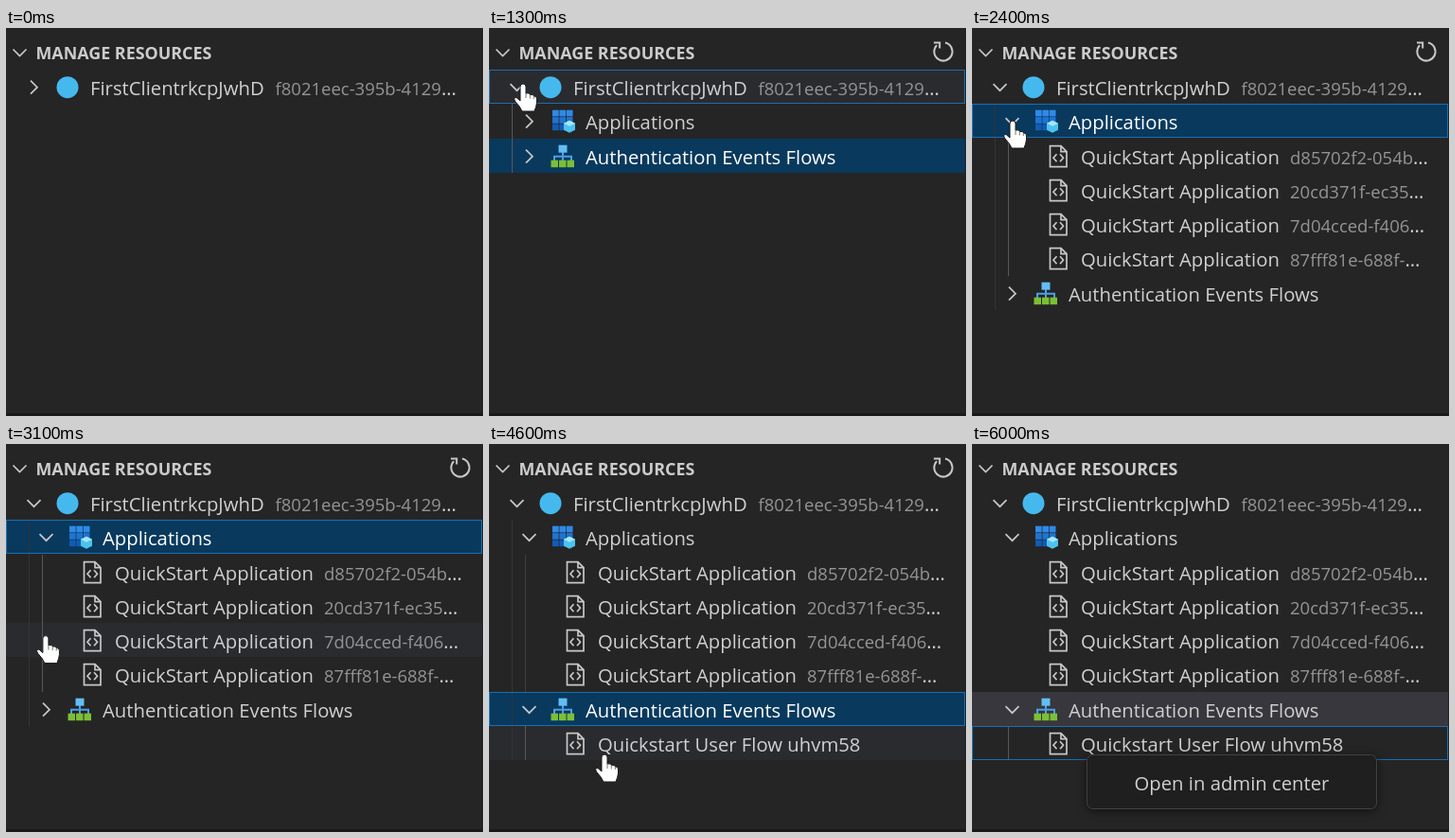
These frames come from a looping animation (504 px wide and 410 px high, 6100 ms). An HTML page:

```html
<!DOCTYPE html>
<html lang="en">
<head>
<meta charset="utf-8">
<title>Resource tree</title>
<style>
  html, body { margin: 0; width: 100%; height: 100%; overflow: hidden; background: #252526; }
  svg { display: block; font: 20.3px "Open Sans", "Noto Sans", sans-serif; fill: #d0d0d0; }
  .bold { font-size: 17.9px; font-weight: 700; fill: #ccc; }
  .id { font-size: 18.5px; fill: #949494; }
  .line { fill: none; stroke: #c8c8c8; stroke-width: 1.7; }
</style>
</head>
<body>
<svg id="stage" width="504" height="410" viewBox="0 0 504 410"></svg>
<script>
const LOOP = 6100, TOP = 44, ROW = 36.25;
const EXPAND_ROOT = 1100, EXPAND_APPS = 2300, EXPAND_FLOWS = 3800, MENU = 4700;
const stage = document.getElementById('stage');

// Pointer path: time, x, y
const path = [
  [400, 40, 72], [800, 36, 59], [1400, 36, 59], [2100, 43, 98], [2800, 43, 98],
  [3370, 41, 291], [3900, 41, 291], [4250, 126, 348], [4500, 122, 328], [MENU, 122, 328]
];

const rect = (x, y, w, h, fill, more = '') =>
  `<rect x="${x}" y="${y}" width="${w}" height="${h}" fill="${fill}" ${more}/>`;
const text = (x, y, s, more = '') => `<text x="${x}" y="${y}" ${more}>${s}</text>`;
const line = (d, more = '') => `<path class="line" d="${d}" ${more}/>`;
const at = (x, y, s) => `<g transform="translate(${x} ${y})">${s}</g>`;

const chevron = (x, y, open) =>
  at(x, y, line(open ? 'M-7-3.5L0 3.5L7-3.5' : 'M-3.5-7L3.5 0L-3.5 7'));

const icons = {
  root: '<circle r="11.5" fill="#45b9ee"/>',
  apps: [0, 1, 2].map(r => [0, 1, 2].map(c =>
      rect(-11 + c * 7.4, -12 + r * 7.4, 6.7, 6.7, ['#2f8ae6', '#1f74d2', '#125cb4'][r])).join('')).join('') +
    '<path d="M7-1L13 2V9L7 12L1 9V2Z" fill="#4cc3ee"/><path d="M7-1L13 2L7 5L1 2Z" fill="#a5e6fa"/>',
  flows: '<path d="M0-5V5M-9 5V0H9V5" fill="none" stroke="#4a9fe6" stroke-width="2"/>' +
    rect(-4.5, -12, 9, 8, '#62bdf4') +
    [-12.5, -4, 4.5].map(x => rect(x, 4, 7.5, 7.5, '#7cbf35')).join(''),
  file: line('M-8.5-11H3L9-5V11H-8.5ZM3-11V-5H9M-1.5-2.5L-5 1.5L-1.5 5.5M2-2.5L5.5 1.5L2 5.5')
};

const refresh = line('M482 15.6A9.6 9.6 0 1 1 473.2 18.2M470 15.5H476.2V21.5', 'style="stroke-width:2"');
const hand = '<path d="M-3 3A3 3 0 0 1 3 3V10Q7 9 7.5 11.5Q11 10.5 11.5 13Q14.5 12.5 14.5 16V20Q14 24 12 29H-1' +
  'Q-3 24-8 19Q-11 14.5-7 14.5L-3 18Z" fill="#fff" stroke="#1a1a1a"/>' +
  '<path d="M3 10V15M7.3 11.5V15.5M11.3 13V16" stroke="#555" stroke-width=".8"/>';

const leaf = (name, id) => ({ level: 2, icon: 'file', name, id, idX: 336 });

function rowsAt(t) {
  const root = t >= EXPAND_ROOT, apps = t >= EXPAND_APPS, flows = t >= EXPAND_FLOWS;
  const rows = [{ level: 0, icon: 'root', name: 'FirstClientrkcpJwhD', id: 'f8021eec-395b-4129', idX: 284.5, open: root }];
  if (root) rows.push({ level: 1, icon: 'apps', name: 'Applications', open: apps });
  if (apps) rows.push(...['d85702f2-054b', '20cd371f-ec35', '7d04cced-f406', '87fff81e-688f-']
    .map(id => leaf('QuickStart Application', id)));
  if (root) rows.push({ level: 1, icon: 'flows', name: 'Authentication Events Flows', open: flows });
  if (flows) rows.push(leaf('Quickstart User Flow uhvm58'));
  return rows;
}

// Selected row, focused row and the guide shown as active: [x, first row, end row]
function stateAt(t) {
  if (t < EXPAND_ROOT) return {};
  if (t < EXPAND_APPS) return { selected: 2, focus: 0, guide: [24.5, 1, 3] };
  if (t < EXPAND_FLOWS) return { selected: 1, focus: 1, guide: [38.5, 2, 6] };
  return { selected: 6, focus: t < MENU ? 6 : 7, guide: [38.5, 7, 8] };
}

function pointerAt(t) {
  const i = path.findIndex(p => p[0] > t);
  if (i < 1) return null;
  const [t0, x0, y0] = path[i - 1], [t1, x1, y1] = path[i];
  const u = (t - t0) / (t1 - t0), e = u * u * (3 - 2 * u);
  return { x: x0 + (x1 - x0) * e, y: y0 + (y1 - y0) * e };
}

const rowTop = i => Math.round(TOP + i * ROW);
const guideLine = ([x, a, b], color) =>
  `<path d="M${x} ${rowTop(a)}V${rowTop(b)}" stroke="${color}"/>`;

function drawRow(row, i, lit) {
  const y = rowTop(i), x = 89 + row.level * 13, mid = y + 18.7;
  let s = row.level < 2 ? chevron(29.5 + row.level * 13, mid, row.open) : '';
  s += at(x - 24, mid, icons[row.icon]);
  s += text(x, y + 27, row.name, lit ? 'fill="#fff"' : '');
  if (row.id) s += text(row.idX, y + 27, `<tspan class="id">${row.id}</tspan>…`);
  return s;
}

function draw(t) {
  const rows = rowsAt(t), state = stateAt(t), pointer = pointerAt(t), menu = t >= MENU;
  const hover = pointer ? Math.floor((pointer.y - TOP) / ROW) : -1;
  const band = (i, fill) => rect(0, rowTop(i), 504, 36, fill);
  let s = '';
  if (hover >= 0 && hover < rows.length) s += band(hover, '#2a2b2e');
  if (state.selected) s += band(state.selected, menu ? '#37373d' : '#09395d');
  if (pointer && rows.length > 3) {
    s += guideLine([24.5, 1, rows.length], '#343434') + guideLine([38.5, 2, 6], '#3e3e3e');
  }
  if (state.guide) s += guideLine(state.guide, '#585858');
  s += rect(503, 0, 1, 410, '#1f1f1f') + rect(0, 407, 504, 3, '#1c181a');
  if (state.focus >= 0) {
    s += rect(0.5, rowTop(state.focus) + 0.5, 502, 35, 'none', 'stroke="#1a6fb0"');
  }
  s += chevron(14.5, 26, true) + text(31.5, 33, 'MANAGE RESOURCES', 'class="bold"');
  s += rows.map((row, i) => drawRow(row, i, i === state.selected && !menu)).join('');
  if (pointer) s += refresh + at(pointer.x, pointer.y, hand);
  if (menu) {
    s += rect(121.5, 328.5, 306, 57, '#1f1f1f', 'rx="6" stroke="#414141" style="filter:drop-shadow(0 2px 5px #0008)"');
    s += text(171.5, 366, 'Open in admin center');
  }
  stage.innerHTML = s;
}

function tick(now) {
  draw(now % LOOP);
  requestAnimationFrame(tick);
}
draw(0);
requestAnimationFrame(tick);
</script>
</body>
</html>
```
